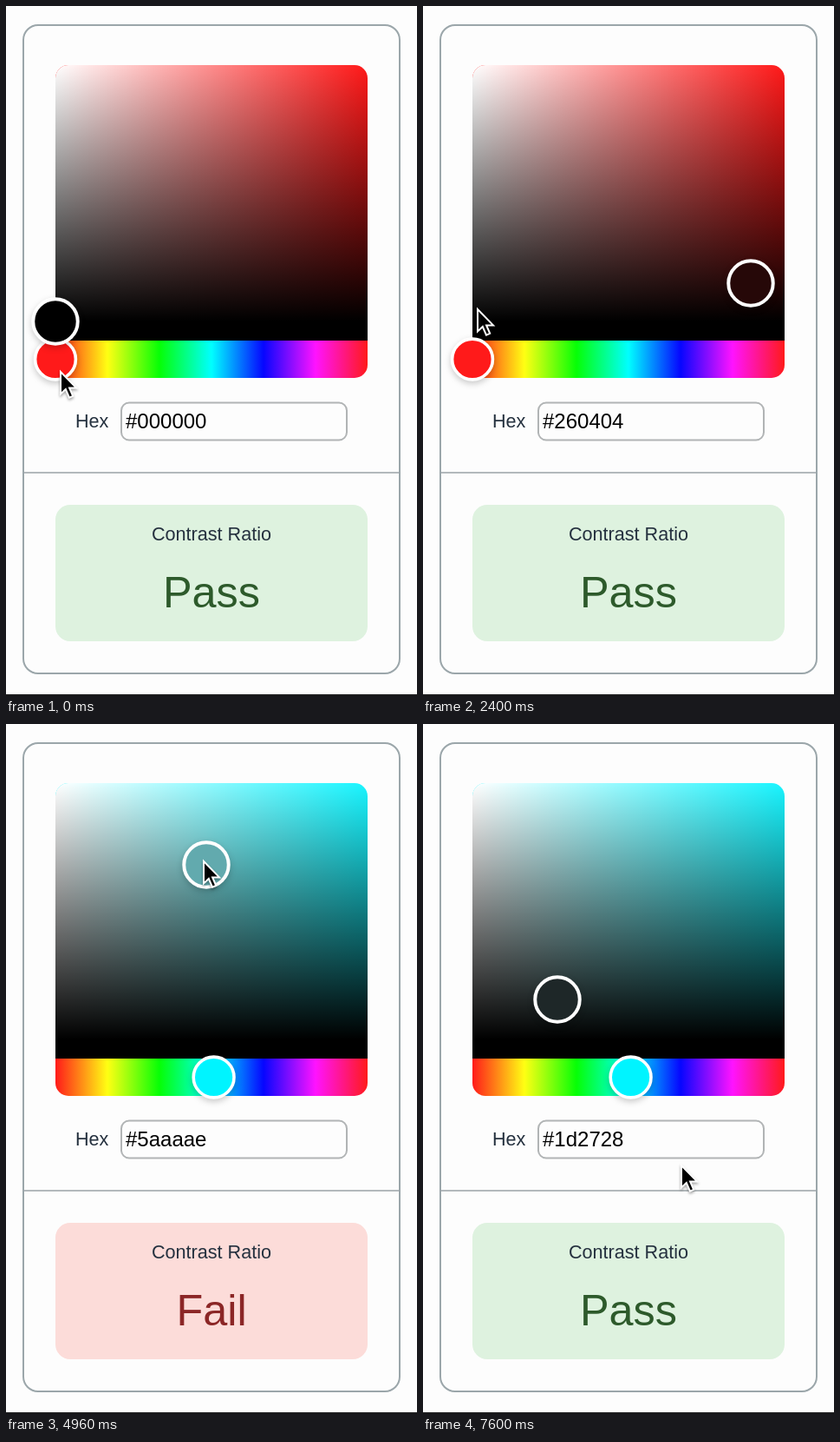
Animation of 474x794 px, one loop 7680 ms. Source, as an HTML page:

```html
<!DOCTYPE html>
<html lang="en">
<head>
<meta charset="utf-8">
<title>Contrast picker</title>
<style>
  html, body { margin: 0; width: 100%; height: 100%; overflow: hidden; background: #fdfdfd; }
  svg { display: block; width: 474px; height: 794px; }
  text { font-family: "Liberation Sans", Arial, sans-serif; font-size: 21.6px; fill: #25313f; }
  .frame { fill: none; stroke: #9ba6aa; stroke-width: 2; }
  .field { fill: #fdfdfd; stroke: #b1b4b5; stroke-width: 2; }
  #hex { font-size: 24px; fill: #000; }
  #verdict { font-size: 50.4px; }
  .pass #card { fill: #def2df; }
  .pass #verdict { fill: #2d5a2b; }
  .fail #card { fill: #fcdcd9; }
  .fail #verdict { fill: #8b2626; }
  .knob { stroke: #fff; filter: drop-shadow(0 3.6px 3.6px rgba(0, 0, 0, .2)); }
  #mouse { fill: #000; stroke: #fff; stroke-width: 2; filter: drop-shadow(0 2px 1.5px rgba(0, 0, 0, .35)); }
</style>
</head>
<body>
<svg id="stage" class="pass" viewBox="0 0 474 794">
  <defs>
    <linearGradient id="white">
      <stop stop-color="#fff"/>
      <stop offset="1" stop-color="#fff" stop-opacity="0"/>
    </linearGradient>
    <linearGradient id="black" x2="0" y2="1">
      <stop stop-opacity="0"/>
      <stop offset="1"/>
    </linearGradient>
    <linearGradient id="rainbow"></linearGradient>
    <clipPath id="round"><rect x="57" y="68" width="360" height="360" rx="15"/></clipPath>
  </defs>

  <rect width="474" height="794" fill="#fdfdfd"/>
  <rect y="792" width="474" height="2" fill="#1c1c1e"/>
  <rect class="frame" x="20" y="22" width="434" height="746" rx="17"/>
  <path d="M21 537H453" stroke="#b3b9bc" stroke-width="1.8"/>

  <g clip-path="url(#round)">
    <rect id="base" x="57" y="68" width="360" height="295"/>
    <rect x="57" y="68" width="360" height="295" fill="url(#white)"/>
    <rect x="57" y="68" width="360" height="295" fill="url(#black)"/>
    <rect x="57" y="362.5" width="360" height="22.5"/>
    <rect x="57" y="385" width="360" height="43" fill="url(#rainbow)"/>
  </g>

  <text x="80" y="485">Hex</text>
  <rect class="field" x="133" y="456.5" width="260" height="43" rx="9"/>
  <text id="hex" x="138" y="486"></text>

  <rect id="card" x="57" y="574" width="360" height="157" rx="17"/>
  <text x="237" y="615" text-anchor="middle">Contrast Ratio</text>
  <text id="verdict" x="237" y="691.5" text-anchor="middle"></text>

  <circle id="hueKnob" class="knob"/>
  <circle id="pickKnob" class="knob"/>
  <path id="mouse" d="M1 2V27.5L6.8 22L11 31.6L15.2 29.8L11.1 20.4H19Z"/>
</svg>
<script>
  const LOOP = 7680, STEP = 80;
  const LEFT = 57, TOP = 68, WIDTH = 360, DEPTH = 295;

  // Turning points of the mouse: time, x, y
  const route = [
    [0, 62, 419], [240, 57, 363], [800, 59, 66], [880, 99.4, 64], [1040, 101, 64],
    [1400, 335, 110], [1920, 378, 319], [2400, 62, 347], [2880, 57, 405],
    [3600, 239.6, 405], [3760, 248, 405], [4240, 378, 319], [4880, 231, 162],
    [5200, 215, 138], [5680, 101.6, 196.4], [6400, 75, 270], [6800, 155, 317], [7520, 297, 506]
  ];

  const el = id => document.getElementById(id);
  const clamp = (v, lo, hi) => Math.max(lo, Math.min(hi, v));
  const rgb = c => `rgb(${c.map(Math.round).join()})`;

  function mouseAt(t) {
    const i = clamp(route.findLastIndex(p => p[0] <= t), 0, route.length - 2);
    const [t0, x0, y0] = route[i], [t1, x1, y1] = route[i + 1];
    const k = clamp((t - t0) / (t1 - t0), 0, 1);
    return [x0 + (x1 - x0) * k, y0 + (y1 - y0) * k];
  }

  function hsv(hue, s, v) {
    return [5, 3, 1].map(n => {
      const k = (n + hue / 60) % 6;
      return 255 * v * (1 - s * clamp(Math.min(k, 4 - k), 0, 1));
    });
  }

  // Reds look slightly softer on screen than cyans.
  const stripColor = hue => hsv(hue, .95 - .05 * Math.cos(hue * Math.PI / 180), 1);
  const areaColor = (hue, s, v) => hsv(hue, s * .9, v);

  function contrastOnWhite(c) {
    const [r, g, b] = c.map(v => {
      v /= 255;
      return v <= .04045 ? v / 12.92 : ((v + .055) / 1.055) ** 2.4;
    });
    return 1.05 / (.2126 * r + .7152 * g + .0722 * b + .05);
  }

  function placeKnob(id, x, y, active, color) {
    const knob = el(id), scale = active ? 1.1 : 1;
    knob.setAttribute("cx", x);
    knob.setAttribute("cy", y);
    knob.setAttribute("r", 23.4 * scale);
    knob.style.strokeWidth = 3.6 * scale;
    knob.style.fill = rgb(color);
  }

  function draw(now) {
    const t = Math.floor(now % LOOP / STEP) * STEP;
    const late = t - STEP; // knobs trail the mouse by one step
    const pickTime = late < 4240 ? clamp(late, 240, 1920) : Math.min(late, 6800);
    const [px, py] = mouseAt(pickTime);
    const x = clamp(px, LEFT, LEFT + WIDTH), y = clamp(py, TOP, TOP + DEPTH);
    const hueX = mouseAt(clamp(late, 2880, 3600))[0];

    const hue = hueX - LEFT, s = (x - LEFT) / WIDTH, v = 1 - (y - TOP) / DEPTH;
    const color = hsv(hue, s, v).map(Math.round);
    const pass = contrastOnWhite(color) >= 3;
    const onHue = t >= 2880 && t < 4240;

    el("base").style.fill = rgb(areaColor(hue, 1, 1));
    placeKnob("hueKnob", hueX, 406.5, onHue, stripColor(hue));
    placeKnob("pickKnob", x, y, !onHue, areaColor(hue, s, v));
    el("hex").textContent = "#" + color.map(c => c.toString(16).padStart(2, "0")).join("");
    el("verdict").textContent = pass ? "Pass" : "Fail";
    el("stage").setAttribute("class", pass ? "pass" : "fail");
    el("mouse").setAttribute("transform", `translate(${mouseAt(t)})`);
  }

  for (let hue = 0; hue <= 360; hue += 60) {
    const stop = document.createElementNS("http://www.w3.org/2000/svg", "stop");
    stop.setAttribute("offset", hue / 360);
    stop.setAttribute("stop-color", rgb(stripColor(hue)));
    el("rainbow").append(stop);
  }

  const start = performance.now();
  function tick() {
    draw(performance.now() - start);
    requestAnimationFrame(tick);
  }
  tick();
</script>
</body>
</html>
```
